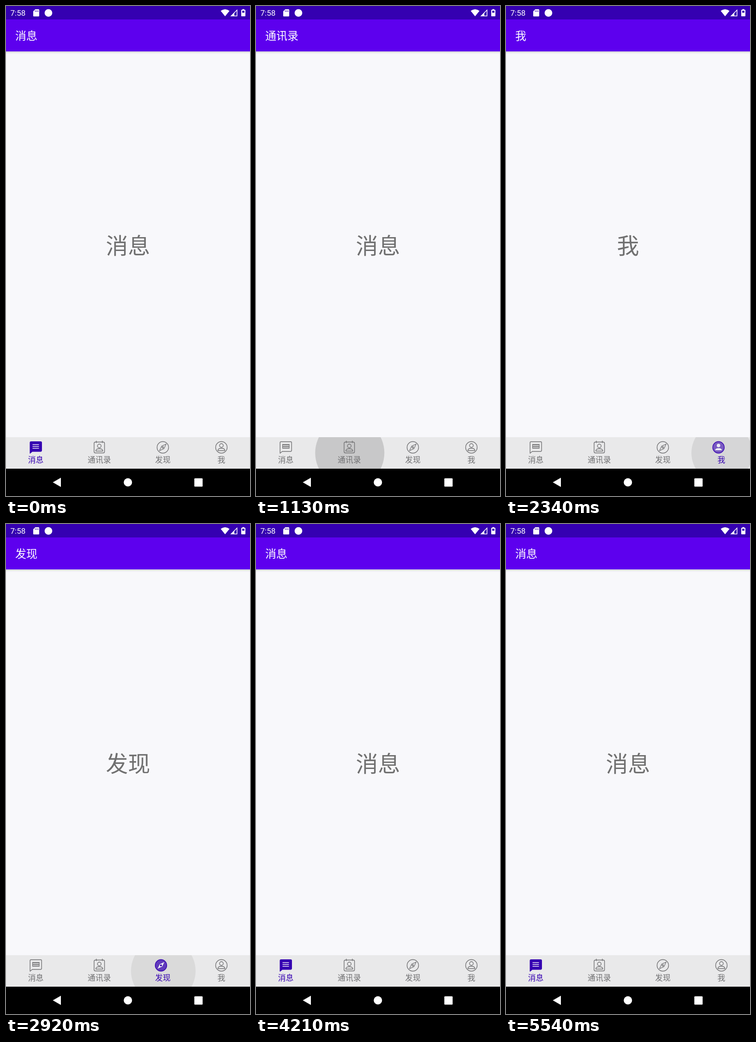
Write an HTML page that moves like this. It is 529 by 1058 pixels and loops after 5580 ms.

```html
<!DOCTYPE html>
<html lang="zh-CN">
<head>
<meta charset="utf-8">
<title>Bottom navigation</title>
<style>
  html, body { margin: 0; width: 100%; height: 100%; overflow: hidden; background: #000; }
  svg { display: block; width: 100%; height: 100%; }
  text { font-family: "Noto Sans CJK SC", "Noto Sans CJK", sans-serif; }
  .clock { font: 17px Roboto, sans-serif; fill: #fff; }
  .title { font-size: 24px; fill: #fff; }
  .page { font-size: 48px; fill: #707070; text-anchor: middle; }
  .label { font-size: 16.8px; text-anchor: middle; }
  .line { fill: none; stroke-width: 1.4; stroke-linejoin: round; }
  .cut { fill: #ececf4; }
  .cutline { fill: none; stroke: #ececf4; stroke-width: 1.5; }
</style>
</head>
<body>
<svg viewBox="0 0 529 1058">
  <defs>
    <linearGradient id="shade" x1="0" y1="0" x2="0" y2="1">
      <stop offset="0" stop-color="#000" stop-opacity=".15"/>
      <stop offset="1" stop-color="#000" stop-opacity="0"/>
    </linearGradient>
    <clipPath id="bar"><rect y="931" width="529" height="68"/></clipPath>
  </defs>

  <rect width="529" height="1058" fill="#f8f8fb"/>
  <rect y="98" width="529" height="5" fill="url(#shade)"/>
  <rect y="29" width="529" height="69" fill="#5d00ee"/>
  <rect width="529" height="29" fill="#3500b1"/>

  <text class="clock" x="9.5" y="21">7:58</text>
  <g fill="#fff">
    <path d="M63.5 7H70.5Q72 7 72 8.5V21Q72 22.500 70.500 22.500H60.500Q59 22.500 59 21V11.500Z"/>
    <path d="M63.500 9.500V12.500M66.500 9.500V12.500M69.500 9.500V12.500" stroke="#3500b1" stroke-width="1.300"/>
    <circle cx="92" cy="15" r="8.300"/>
    <path d="M465.500 10.500Q475 3.500 484.500 10.500L475 22.300Z"/>
    <path fill-rule="evenodd" d="M501.500 7V22.300H486.300ZM500 10.600L495 15.700V20.800H500Z"/>
    <path d="M512.500 8.300V6.800H516.500V8.300H518Q519 8.300 519 9.300V21.300Q519 22.300 518 22.300H511Q510 22.300 510 21.300V9.300Q510 8.300 511 8.300Z"/>
    <path d="M512 10.300H517V14.500H512Z" fill="#3500b1"/>
  </g>

  <text class="title" id="title" x="20" y="73"></text>
  <text class="page" id="page" x="264.500" y="534.500"></text>

  <rect y="931" width="529" height="68" fill="#e9e9ea"/>
  <g id="ripples" clip-path="url(#bar)"></g>
  <g id="tabs"></g>

  <rect y="999" width="529" height="59"/>
  <g fill="#fff">
    <path d="M101.500 1028.500L119 1018.500V1038.500Z"/>
    <circle cx="264.300" cy="1028.500" r="9"/>
    <rect x="408.300" y="1019.800" width="18" height="18" rx="1.500"/>
  </g>
</svg>

<script>
const LOOP = 5580, HOLD = 210, LAG = 25, SLIDE = 165, GROW = 225, FADE = 250;
const GREY = '#707072', ACCENT = '#3500b1';

// Icon parts are centred on 0,0: outline, solid shape, extra detail for each state
const bubble = 'M-12.300 12.800V-10.200Q-12.300 -12.300 -10.200 -12.300H10.600Q12.700 -12.300 12.700 -10.200V6.600Q12.700 8.700 10.600 8.700H-7.600Z';
const card = 'M-8.500 -11.500H8.500Q11.300 -11.500 11.300 -8.700V9.200Q11.300 12 8.500 12H-8.500Q-11.300 12 -11.300 9.200V-8.700Q-11.300 -11.500 -8.500 -11.500Z';
const pins = 'M-6.500 -14.300V-9.500M6.500 -14.300V-9.500';
const disc = 'M-12.500 0A12.500 12.500 0 0 1 12.500 0A12.500 12.500 0 0 1 -12.500 0Z';
const needle = 'M7.300 -7.300L2.600 2.600L-7.300 7.300L-2.600 -2.600Z';
const path = (d, cls = '', more = '') => `<path class="${cls}" d="${d}" ${more}/>`;
const person = (cls, y, r, w, h) =>
  `<circle class="${cls}" cy="${y}" r="${r}"/>` +
  path(`M${-w} ${y + r + h + 2}Q${-w} ${y + r + 2} 0 ${y + r + 2}T${w} ${y + r + h + 2}Z`, cls);

const tabs = [
  { name: '消息', x: 64.500, r: 70, shape: bubble,
    off: path('M-7.500 -6H8M-7.500 -2.200H8M-7.500 1.600H8', 'line', 'style="stroke-width:2"') +
         path('M-7 -6.500V2M7.500 -6.500V2', 'line', 'style="stroke-width:1"'),
    on: path('M-7 -6H7M-7 -2H7M-7 2H7', 'cutline') },
  { name: '通讯录', x: 202.300, r: 75, shape: card,
    off: path(pins, 'line') + person('line', -3, 4, 7.600, 5),
    on: path(pins, 'line', 'style="stroke-width:3"') + person('cut', -3, 3.200, 6.500, 4) },
  { name: '发现', x: 340, r: 70, shape: disc,
    off: path(needle, 'line', 'style="stroke-width:1.200"') + '<circle class="line" r="1.600"/>',
    on: path(needle, 'cut') + `<circle r="1.600" fill="${ACCENT}"/>` },
  { name: '我', x: 467, r: 66, shape: disc,
    off: person('line', -4, 4, 7.600, 5),
    on: person('cut', -4, 3.800, 7.300, 4.500) }
];

// Press time, tab, touch point
const taps = [
  [905, 1, 210, 966], [1455, 2, 344, 967], [2010, 3, 474, 968],
  [2565, 2, 336, 967], [3120, 1, 197, 968], [3660, 0, 39, 973]
].map(([down, tab, x, y]) => ({ down, tab, x, y, pick: down + HOLD }));

const byId = id => document.getElementById(id);
const clamp = v => Math.max(0, Math.min(1, v));
const mix = (a, b, p) => a + (b - a) * p;

byId('tabs').innerHTML = tabs.map(t => `
  <g>
    <g class="icon">
      ${path(t.shape, 'solid', `fill="${ACCENT}"`)}
      ${path(t.shape, 'line')}
      <g class="off">${t.off}</g><g class="on">${t.on}</g>
    </g>
    <text class="label" x="${t.x}" y="986">${t.name}</text>
  </g>`).join('');
byId('ripples').innerHTML = taps.map(() => '<circle/>').join('');

const views = [...byId('tabs').children].map(g => ({
  icon: g.querySelector('.icon'), solid: g.querySelector('.solid'),
  off: g.querySelector('.off'), on: g.querySelector('.on'), label: g.querySelector('text')
}));
const circles = [...byId('ripples').children];
const lastTab = (now, lag) => taps.reduce((tab, p) => now >= p.pick + lag ? p.tab : tab, 0);

function drawTab(i, selected, amount) {
  const v = views[i], color = selected ? ACCENT : GREY;
  const shift = selected ? -15 * (1 - amount) : 0;
  v.icon.setAttribute('transform', `translate(${tabs[i].x + shift} 953)`);
  v.icon.setAttribute('stroke', color);
  v.solid.setAttribute('stroke', 'none');
  v.solid.setAttribute('opacity', selected ? amount : 0);
  v.off.setAttribute('display', selected ? 'none' : 'inline');
  v.on.setAttribute('display', selected ? 'inline' : 'none');
  v.on.setAttribute('stroke', selected ? ACCENT : 'none');
  v.on.querySelectorAll('.cut').forEach(c => c.setAttribute('stroke', 'none'));
  v.label.setAttribute('fill', color);
}

function drawRipple(circle, p, now) {
  const age = now - p.down, tab = tabs[p.tab];
  const e = 1 - (1 - clamp(age / GROW)) ** 2;
  const fade = 1 - clamp((now - Math.max(p.pick, p.down + GROW)) / FADE);
  circle.setAttribute('cx', mix(p.x, tab.x + 1, e));
  circle.setAttribute('cy', mix(p.y, 965, e));
  circle.setAttribute('r', tab.r * mix(.3, 1, e));
  circle.setAttribute('opacity', age < 0 ? 0 : .14 * clamp(age / 90) * fade);
}

function draw(now) {
  const picked = lastTab(now, 0), shown = lastTab(now, LAG);
  const recent = taps.filter(p => now >= p.pick + LAG).pop();
  const amount = recent ? clamp((now - recent.pick - LAG) / SLIDE) : 1;
  byId('title').textContent = tabs[picked].name;
  byId('page').textContent = tabs[shown].name;
  tabs.forEach((t, i) => drawTab(i, i === picked && i === shown, amount));
  taps.forEach((p, i) => drawRipple(circles[i], p, now));
}

const start = performance.now();
function tick() {
  draw((performance.now() - start) % LOOP);
  requestAnimationFrame(tick);
}
tick();
</script>
</body>
</html>
```
